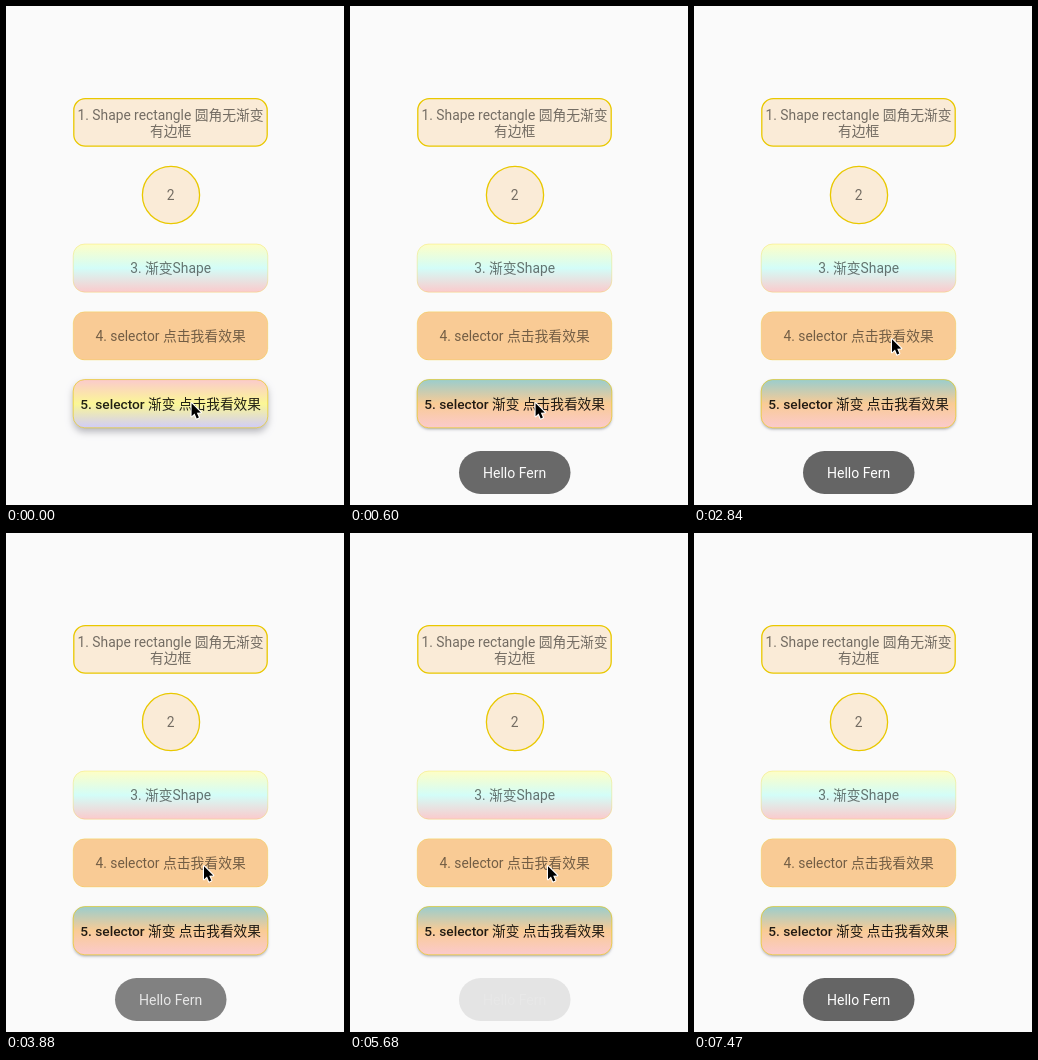
Animation of 338x499 px, one loop 8520 ms. Source, as an HTML page with a canvas:

```html
<!DOCTYPE html>
<html lang="zh-CN">
<head>
<meta charset="utf-8">
<title>Shape demo</title>
<style>
html, body { margin: 0; width: 100%; height: 100%; overflow: hidden; background: #fafafa; }
canvas { display: block; width: 338px; height: 499px; }
</style>
</head>
<body>
<canvas id="stage"></canvas>
<script>
const W = 338, H = 499, LOOP = 8520, STEPS = 57;
const FONT = 'Roboto, "Noto Sans CJK SC", "Noto Sans CJK", sans-serif';
const GOLD = '#e9c800', CREAM = '#faebd7';
const ORANGE = '#f9cb95', PINK = '#fbcacc';
const SOFT = 'rgba(0,0,0,.54)', DARK = 'rgba(0,0,0,.87)';
const CX = 164.6, LEFT = 67.2, WIDTH = 194.6, RADIUS = 11.5;
const TOP = 238, GAP = 67.8, TALL = 48.2;

// Cursor path: [step, x, y]
const path = [
  [12, 184.6, 396], [13, 191, 362], [14, 194, 337.5], [19, 197, 332],
  [47, 197, 332], [48, 250, 418.5], [50, 315, 562]
];

const canvas = document.getElementById('stage');
const ctx = canvas.getContext('2d');
const ratio = window.devicePixelRatio || 1;
canvas.width = W * ratio;
canvas.height = H * ratio;

const clamp = v => Math.min(1, Math.max(0, v));

function cursorAt(n) {
  const i = path.findIndex(k => k[0] > n);
  if (i === 0) return path[0].slice(1);
  if (i < 0) return path[path.length - 1].slice(1);
  const [n0, x0, y0] = path[i - 1], [n1, x1, y1] = path[i];
  const p = (n - n0) / (n1 - n0);
  return [x0 + (x1 - x0) * p, y0 + (y1 - y0) * p];
}

function toastAlpha(n) {
  const fadeIn = from => 1 - (1 - clamp((n - from + .2) / 2.67)) ** 2;
  if (n >= 38) return fadeIn(38);
  if (n < 2) return 0;
  return n < 26 ? fadeIn(2) : 1 - clamp((n - 26 + .38) / 2);
}

function box(x, y, w, h, r) {
  ctx.beginPath();
  ctx.roundRect(x, y, w, h, r);
}

function blend(y, ...colors) {
  const g = ctx.createLinearGradient(0, y, 0, y + TALL);
  colors.forEach((c, i) => g.addColorStop(i / (colors.length - 1), c));
  return g;
}

function label(text, y, color = SOFT, size = 13.8, weight = 400) {
  ctx.font = `${weight} ${size}px ${FONT}`;
  ctx.textAlign = 'center';
  ctx.fillStyle = color;
  ctx.fillText(text, CX, y);
}

function paint(fill, lineWidth) {
  ctx.fillStyle = fill;
  ctx.fill();
  ctx.strokeStyle = GOLD;
  ctx.lineWidth = lineWidth;
  ctx.stroke();
}

function panel(y, fill, edge = .25) {
  box(LEFT, y, WIDTH, TALL, RADIUS);
  paint(fill, edge);
}

function castShadow(y, drop, blur, alpha) {
  ctx.save();
  ctx.shadowColor = `rgba(0,0,20,${alpha})`;
  ctx.shadowOffsetY = drop * ratio;
  ctx.shadowBlur = blur * ratio;
  box(LEFT, y, WIDTH, TALL, RADIUS);
  ctx.fillStyle = '#ddd';
  ctx.fill();
  ctx.restore();
}

function raisedButton(y, pressed) {
  if (pressed) castShadow(y, 4, 7, .28);
  else castShadow(y, 1.6, 2.5, .28);
  panel(y, pressed ? blend(y, PINK, '#fbf796', '#d0ccf8') : blend(y, '#9acdcd', ORANGE, PINK), .6);
  label('5. selector 渐变 点击我看效果', 402.5, DARK, 13.7, 500);
}

function toast(alpha) {
  ctx.save();
  ctx.globalAlpha = alpha;
  box(109, 445, 111.5, 43, 21.5);
  ctx.fillStyle = '#656565';
  ctx.fill();
  label('Hello Fern', 472.3, '#fff', 14);
  ctx.restore();
}

function cursor(x, y) {
  const shape = [[0, 0], [0, 13], [3, 10.2], [5.1, 15.2], [7.3, 14.2], [5.2, 9.4], [9.2, 9.2]];
  ctx.save();
  ctx.translate(x + 1, y + 1.3);
  ctx.beginPath();
  for (const [px, py] of shape) ctx.lineTo(px, py);
  ctx.closePath();
  ctx.lineJoin = 'round';
  ctx.lineWidth = 2.2;
  ctx.strokeStyle = '#fff';
  ctx.stroke();
  ctx.fillStyle = '#000';
  ctx.fill();
  ctx.restore();
}

function draw(n) {
  ctx.setTransform(ratio, 0, 0, ratio, 0, 0);
  ctx.fillStyle = '#fafafa';
  ctx.fillRect(0, 0, W, H);

  box(LEFT + .6, 92.6, WIDTH - 1.2, 47.6, RADIUS);
  paint(CREAM, 1.3);
  label('1. Shape rectangle 圆角无渐变', 113.8);
  label('有边框', 130);

  ctx.beginPath();
  ctx.arc(165, 189, 28.6, 0, Math.PI * 2);
  paint(CREAM, 1.3);
  label('2', 194);

  panel(TOP, blend(TOP, '#fefec6', '#d3fdf8', PINK));
  label('3. 渐变Shape', 267.2);

  panel(TOP + GAP, n >= 27 && n < 38 ? PINK : ORANGE);
  label('4. selector 点击我看效果', 335);

  raisedButton(TOP + 2 * GAP, n < 2);
  toast(toastAlpha(n));
  cursor(...cursorAt(n));
}

const start = performance.now();
function tick() {
  const t = (performance.now() - start) % LOOP;
  // The picture holds still within each step.
  draw(Math.floor((t + 10) / LOOP * STEPS) % STEPS);
  requestAnimationFrame(tick);
}
tick();
</script>
</body>
</html>
```
